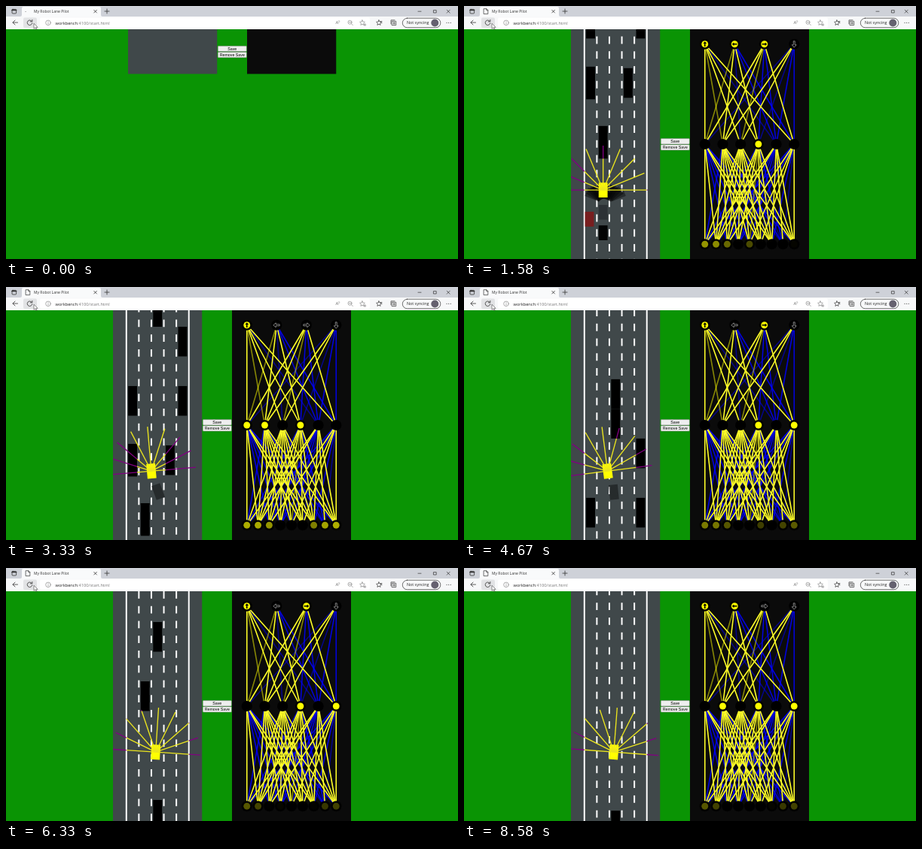
An HTML page with a canvas for the animation above (8660 ms loop, 600x337 px).

```html
<!DOCTYPE html>
<html lang="en">
<head>
<meta charset="utf-8">
<title>My Robot Lane Pilot</title>
<style>
  html, body { margin: 0; width: 100%; height: 100%; overflow: hidden; background: #0a9404; }
  canvas, svg { position: absolute; left: 0; top: 0; width: 100vw; height: 100vh; display: block; }
  text { font-family: "Open Sans", "Noto Sans", sans-serif; }
  .button text { font: 5.27px "Liberation Sans", Arial, sans-serif; text-anchor: middle; }
  .button rect { fill: #efefef; stroke: #777; stroke-width: .5; }
  .line { fill: none; stroke: #333; stroke-width: .8; stroke-linecap: round; stroke-linejoin: round; }
</style>
</head>
<body>
<canvas id="page" width="600" height="337"></canvas>
<svg viewBox="0 0 600 337" preserveAspectRatio="none">
  <g class="button" id="buttons">
    <rect x=".3" y=".3" width="38" height="7.3" rx=".8"/><text x="19.3" y="5.8">Save</text>
    <rect x=".3" y="8.4" width="38" height="7.3" rx=".8"/><text x="19.3" y="13.9">Remove Save</text>
  </g>
  <rect width="600" height="14" fill="#ced1d8"/>
  <rect y="14" width="600" height="17" fill="#f7f8f9"/>
  <path d="M19 14q2 0 2-2V3q0-2 2-2H124q2 0 2 2v9q0 2 2 2z" fill="#f9fafb"/>
  <rect x="45" y="15.5" width="438" height="13.5" rx="2" fill="#fff"/>
  <rect x="23" y="15.5" width="18" height="13.5" rx="2" fill="#e2e3e5"/>
  <g class="line">
    <rect x="8" y="4.4" width="5.6" height="5.6" rx="1"/><path d="M8 5.5h5.6" stroke-width="1.6"/>
    <path d="M116.8 5.4l3.6 3.6m0-3.6l-3.6 3.6M131 7h6m-3-3v6"/>
    <path d="M547 7.2h4M567.8 5.6h3.4v3.4h-3.4zM585.2 5.2l4 4m0-4l-4 4" stroke-width=".7"/>
    <path d="M15.5 22H9m3-3l-3 3 3 3"/>
    <path d="M34.3 20.4a3.3 3.3 0 1 0 .5 2.4M34.8 18.4v2.4h-2.4"/>
    <g stroke="#777" stroke-width=".6">
      <circle cx="56" cy="22.3" r="3.3"/><path d="M56 22v2M56 20.4v.1"/>
      <circle cx="456.5" cy="21.7" r="2.5"/><path d="M458.4 23.6l2 2M455.4 21.7h2.2"/>
      <path id="star" d="M473 18.8l1 2.2 2.4.3-1.8 1.7.5 2.4-2.1-1.2-2.1 1.2.5-2.4-1.8-1.7 2.4-.3z"/>
      <path d="M475 25h3m-1.5-1.5v3"/>
    </g>
    <use href="#star" x="22" stroke="#333" stroke-width=".7"/>
    <path d="M497 20.5h2m-1 2h1" stroke-width=".7"/>
    <path d="M512.5 20.3h5.2v5.2h-5.2zM511 23.8v-5h5M515.1 21.5v2.8m-1.4-1.4h2.8" stroke-width=".7"/>
    <path d="M585 22.3h.1m2.5 0h.1m2.5 0h.1" stroke-width="1.1"/>
    <rect x="526.3" y="16.2" width="50.5" height="12.6" rx="6.3" stroke-width=".7"/>
    <g id="favicon"><path d="M26.5 3.7h3.4l1.9 1.9v5h-5.3zM29.8 3.7v2h2" stroke-width=".7"/></g>
    <path id="loading" d="M26 7.5h.1" stroke="#555"/>
  </g>
  <circle cx="569.3" cy="22.5" r="5" fill="#65616f"/>
  <text x="437.5" y="24.4" font-size="6" fill="#666">A<tspan font-size="3.5" dy="-2">))</tspan></text>
  <text x="37" y="9.1" font-size="5" fill="#333">My Robot Lane Pilot</text>
  <text x="65.5" y="24.5" font-size="5.7" fill="#222">workbench<tspan fill="#777">:4100/start.html</tspan></text>
  <text x="532" y="24.4" font-size="5.4" fill="#222">Not syncing</text>
  <path d="M37 23.2v7.2l1.7-1.6 1.2 2.6 1.1-.5-1.2-2.5h2.3z" fill="#fff" stroke="#222" stroke-width=".5"/>
</svg>
<script>
const ctx = document.getElementById('page').getContext('2d');
const byId = id => document.getElementById(id);

const LOOP = 8660, SCALE = .395, VIEW = 306 / SCALE, START = .08;
const ROAD = '#40484a', DARK = '#0b0b0b';
const LEFT = 45, RIGHT = 255, LANE = 42;
const DASH = 25;
const laneX = lane => LEFT + LANE * (lane - .5);

// lane, starting y, length
const TRAFFIC = [
  [2, -100, 110], [1, -300, 110], [4, -300, 100], [1, -500, 100], [5, -500, 100],
  [5, -700, 100], [3, -800, 100], [3, -900, 100], [2, -1300, 100], [3, -1500, 100]
];

// seconds, x, heading of the leading car
const STEERING = [
  [0, 108, 0], [2.34, 108, 0], [2.42, 117, .4], [2.5, 138, .35], [2.75, 149, -.02],
  [3.33, 129, -.087], [4.67, 123, -.127], [4.95, 112, -.08], [5.5, 113, .06],
  [6.33, 143.5, .065], [7.1, 143, -.06], [7.35, 116, -.1], [7.9, 116, .06], [8.58, 144, .075]
];

// seconds, outputs, hidden units
const DECISIONS = [
  [0, '1110', '000100'], [2.42, '1010', '000100'], [2.7, '1000', '110100'],
  [3.9, '1010', '000101'], [7.1, '1100', '010101']
];

const smooth = u => u * u * (3 - 2 * u);
function steer(time) {
  let i = 1;
  while (i < STEERING.length - 1 && time > STEERING[i][0]) i++;
  const [t0, x0, a0] = STEERING[i - 1], [t1, x1, a1] = STEERING[i];
  const u = smooth(Math.min(1, (time - t0) / (t1 - t0)));
  return { x: x0 + (x1 - x0) * u, angle: a0 + (a1 - a0) * u };
}

// The simulation runs slowly until most of the crowd has crashed.
const ticksAt = time => 31 * (Math.min(time, 2.35) - START) + 145 * Math.max(0, time - 2.35);
const TOP_TICK = 26.3;
const travelled = n => n < TOP_TICK ? .075 * n * n : .075 * TOP_TICK ** 2 + 3.95 * (n - TOP_TICK);

function line(x0, y0, x1, y1, color, width) {
  ctx.strokeStyle = color;
  ctx.lineWidth = width;
  ctx.beginPath();
  ctx.moveTo(x0, y0);
  ctx.lineTo(x1, y1);
  ctx.stroke();
}

function box(x, y, angle, color, alpha = 1, length = 50) {
  ctx.save();
  ctx.translate(x, y);
  ctx.rotate(angle);
  ctx.globalAlpha = alpha;
  ctx.fillStyle = color;
  ctx.fillRect(-15, -length / 2, 30, length);
  ctx.restore();
}

function panel(x, width, height, color, draw) {
  ctx.save();
  ctx.translate(x, 31);
  ctx.scale(SCALE, SCALE);
  ctx.beginPath();
  ctx.rect(0, 0, width, height);
  ctx.clip();
  ctx.fillStyle = color;
  ctx.fillRect(0, 0, width, height);
  if (draw) draw();
  ctx.restore();
}

// Fraction of the ray before it meets a border or another car.
function reach(x, y, dx, dy, cars) {
  let best = 1;
  const hit = t => { if (t >= 0 && t < best) best = t; };
  if (dx) [LEFT, RIGHT].forEach(edge => hit((edge - x) / dx));
  for (const car of cars) {
    const span = (center, half, from, step) =>
      [(center - half - from) / step, (center + half - from) / step].sort((a, b) => a - b);
    const [x0, x1] = span(car.x, 15, x, dx || 1e-9);
    const [y0, y1] = span(car.y, car.length / 2, y, dy || 1e-9);
    const enter = Math.max(x0, y0);
    if (enter < Math.min(x1, y1)) hit(enter);
  }
  return best;
}

function sense(car, cars) {
  return Array.from({ length: 9 }, (_, i) => {
    const a = car.angle + (i - 4) * Math.PI / 8;
    const dx = 150 * Math.sin(a), dy = -150 * Math.cos(a);
    return { dx, dy, part: reach(car.x, car.y, dx, dy, cars) };
  });
}

function drawCrowd(time, n, car) {
  if (time < 2.45) {
    const spread = Math.min(1, n / 26), late = Math.max(0, Math.min(1, (time - .95) / 1.3));
    for (const side of [-1, 1]) for (let i = 1; i <= 6; i++) {
      const step = side < 0 ? 5.5 : 5.5 + 5 * late;
      box(car.x + side * i * step * spread, car.y + (i * 2 + 3) * spread,
        side * i * (.16 + .08 * late) * spread, '#000', .6 - .4 * late);
    }
    if (time > 1.5) box(108, car.y + 75, 0, '#16161c', .45);
  }
  box(108, 112, 0, '#000', .95);
  if (n > 30) box(62, 66, 0, '#8b1010', .75);
  if (time > 2.5 && time < 5.4) {
    const u = Math.min(1, Math.max(0, (time - 3.33) / 1.34));
    box(152 - 8 * u, car.y + 69 + 2 * u, -.35 + .25 * u, '#15181a', .6);
  }
}

function drawRoad(time, n, car, cars, rays) {
  ctx.translate(0, .7 * VIEW - car.y);
  const top = Math.floor((car.y - VIEW) / (2 * DASH)) * 2 * DASH, bottom = car.y + VIEW;
  for (let i = 0; i <= 5; i++) {
    ctx.setLineDash(i % 5 ? [DASH, DASH] : []);
    line(LEFT + i * LANE, top, LEFT + i * LANE, bottom, '#fff', 5);
  }
  ctx.setLineDash([]);
  for (const c of cars) box(c.x, c.y, 0, '#000', 1, c.length);
  drawCrowd(time, n, car);
  box(car.x, car.y, car.angle, '#ff0');
  for (const { dx, dy, part } of rays) {
    const x = car.x + dx * part, y = car.y + dy * part;
    line(car.x, car.y, x, y, '#ebe51e', 3.4);
    if (part < 1) line(x, y, car.x + dx, car.y + dy, '#800080', 3.4);
  }
}

// One row per unit above: Y/y positive, B/b negative, capitals stronger.
const UPPER = ['YyYYbY', 'yYbYBB', 'YYyBBY', 'bYYbBB'];
const noise = k => { const s = Math.sin(k * 12.9898 + 4.1) * 43758.5453; return s - Math.floor(s); };
const LOWER = Array.from({ length: 6 }, (_, j) => Array.from({ length: 9 }, (_, i) => {
  const r = noise(j * 9 + i);
  return r < .58 ? 'Y' : r < .64 ? 'y' : r < .9 ? 'B' : 'b';
}).join(''));
const WEIGHT = { b: 'rgba(0,0,255,.5)', B: 'rgba(0,0,255,.85)', y: 'rgba(255,255,0,.5)', Y: '#ffff28' };
const ARROW = new Path2D('M0-9L6-2H2V8H-2V-2H-6Z');
const TURNS = [0, -.5, .5, 1];
const nodeX = (i, count) => 50 + 300 * i / (count - 1);

// Weak links lie beneath strong ones.
function drawLinks(rows, yAbove, yBelow) {
  for (const kind in WEIGHT) rows.forEach((row, j) => [...row].forEach((weight, i) => {
    if (weight === kind)
      line(nodeX(i, row.length), yBelow, nodeX(j, rows.length), yAbove, WEIGHT[kind], 4);
  }));
}

function drawNodes(values, y) {
  values.forEach((value, i) => {
    for (const [radius, color] of [[18, '#000'], [11.3, `rgba(255,255,0,${value})`]]) {
      ctx.fillStyle = color;
      ctx.beginPath();
      ctx.arc(nodeX(i, values.length), y, radius, 0, 7);
      ctx.fill();
    }
  });
}

function drawNetwork(time, rays) {
  const [, outputs, hidden] = DECISIONS.filter(d => d[0] <= time).pop();
  const top = 50, middle = VIEW / 2, bottom = VIEW - 50;
  drawLinks(UPPER, top, middle);
  drawLinks(LOWER, middle, bottom);
  drawNodes([...outputs].map(Number), top);
  drawNodes([...hidden].map(Number), middle);
  drawNodes(rays.map(r => 1 - r.part), bottom);
  TURNS.forEach((turn, i) => {
    ctx.save();
    ctx.translate(nodeX(i, 4), top);
    ctx.rotate(turn * Math.PI);
    ctx.fillStyle = '#000';
    ctx.fill(ARROW);
    if (outputs[i] === '0') {
      ctx.scale(1.25, 1.25);
      ctx.strokeStyle = '#aaa';
      ctx.lineWidth = 1.5;
      ctx.stroke(ARROW);
    }
    ctx.restore();
  });
}

function render(now) {
  const step = Math.floor(now % LOOP * .012 + .05), time = step / 12;
  const ready = step > 0;
  ctx.fillStyle = '#0a9404';
  ctx.fillRect(0, 0, 600, 337);
  byId('favicon').style.display = ready ? '' : 'none';
  byId('loading').style.display = ready ? 'none' : '';
  byId('buttons').setAttribute('transform', ready ? 'translate(261 176.3)' : 'translate(281 53)');

  if (ready) {
    const n = ticksAt(time);
    const car = { ...steer(time), y: 100 - travelled(n) };
    const cars = TRAFFIC.map(([lane, y, length]) => ({ x: laneX(lane), y: y - 2 * n, length }));
    const rays = sense(car, cars);
    panel(142, 300, VIEW, ROAD, () => drawRoad(time, n, car, cars, rays));
    panel(300, 400, VIEW, DARK, () => drawNetwork(time, rays));
  } else {
    panel(162, 300, 151, ROAD);
    panel(320, 300, 151, DARK);
  }
}

function tick() {
  render(performance.now());
  requestAnimationFrame(tick);
}
tick();
</script>
</body>
</html>
```
